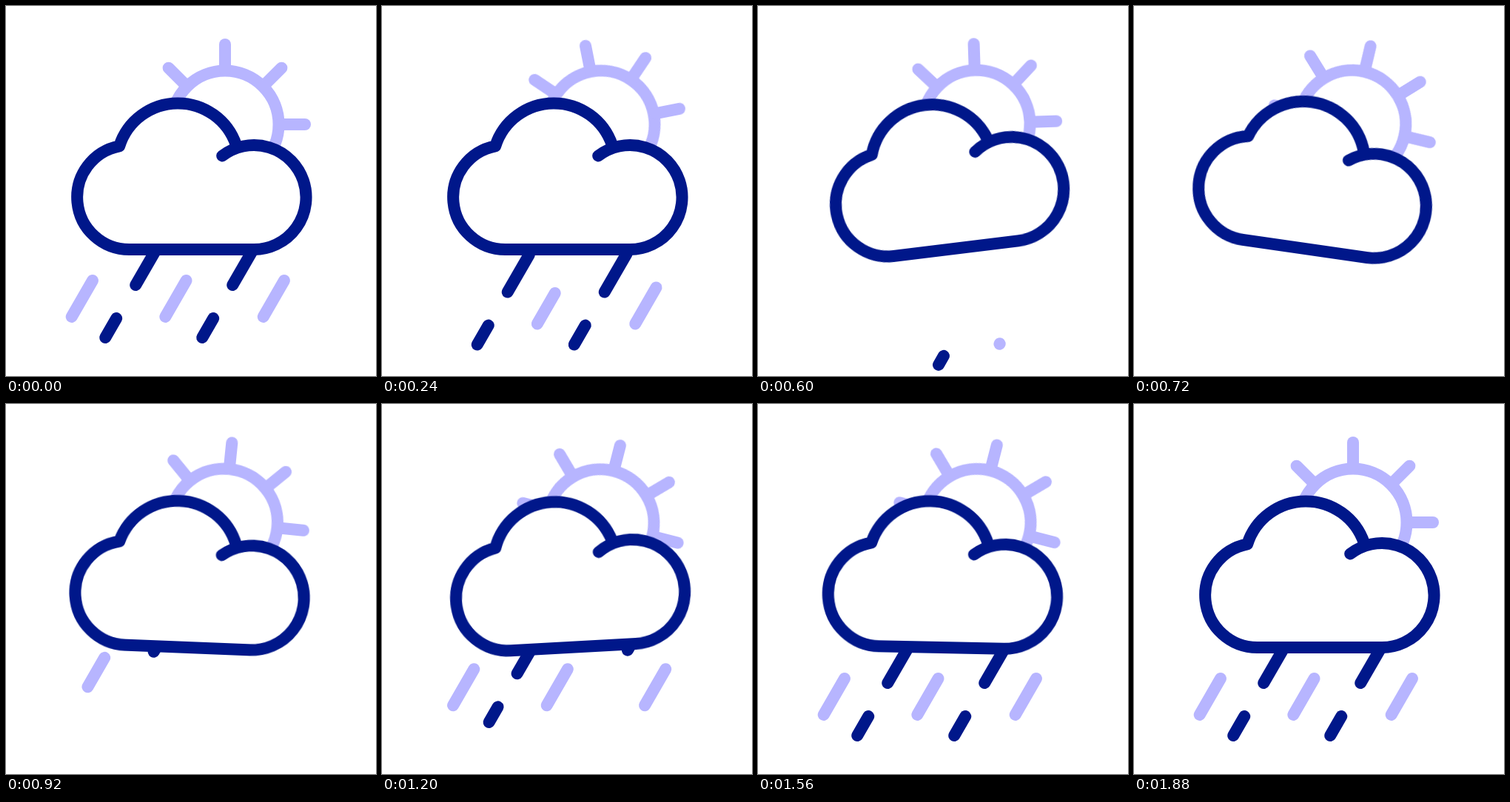
Animation of 500x500 px, one loop 1960 ms. Source, as an HTML page:

```html
<!DOCTYPE html>
<html lang="en">
<head>
<meta charset="utf-8">
<title>Sun, cloud and rain</title>
<style>
  html, body { margin: 0; width: 100%; height: 100%; overflow: hidden; background: #fff; }
  svg {
    --t: 0;
    --dark: #00178a;
    --light: #b7b5ff;
    display: block; width: 100%; height: 100%;
    fill: none; stroke-width: 16; stroke-linecap: round; stroke-linejoin: round;
  }
  /* Animations are paused; the script sets --t in whole steps of 40 ms. */
  #sun, #cloud {
    animation: 1960ms linear infinite paused;
    animation-delay: calc(var(--t) * -1ms);
  }
  #sun { stroke: var(--light); transform-origin: 295.2px 160px; animation-name: spin; }
  #cloud { stroke: var(--dark); fill: #fff; transform-origin: 248px 190px; animation-name: wobble; }
  .light { stroke: var(--light); }
  .dark { stroke: var(--dark); }

  @keyframes spin {
    0%      { transform: rotate(0deg); animation-timing-function: cubic-bezier(.333, 0, .667, 0); }
    12.245% { transform: rotate(-11.2deg); animation-timing-function: cubic-bezier(.333, .208, .667, .636); }
    30.612% { transform: rotate(-91.9deg); animation-timing-function: cubic-bezier(.333, .317, .667, .644); }
    46.939% { transform: rotate(-174.2deg); animation-timing-function: cubic-bezier(.333, .315, .667, .673); }
    61.224% { transform: rotate(-255.6deg); animation-timing-function: cubic-bezier(.333, .38, .667, .827); }
    79.592% { transform: rotate(-345.6deg); animation-timing-function: cubic-bezier(.333, .963, .667, 1); }
    95.918%, 100% { transform: rotate(-360deg); }
  }
  @keyframes wobble {
    0%, 14.286% { transform: rotate(0deg); animation-timing-function: cubic-bezier(.364, 0, .636, 1); }
    26.531% { transform: rotate(-15deg); animation-timing-function: cubic-bezier(.364, 0, .636, 1); }
    36.735% { transform: rotate(8.2deg); animation-timing-function: cubic-bezier(.364, 0, .636, 1); }
    57.143% { transform: rotate(-3.6deg); animation-timing-function: cubic-bezier(.364, 0, .636, 1); }
    77.551% { transform: rotate(1.2deg); animation-timing-function: cubic-bezier(.364, 0, .636, 1); }
    95.918%, 100% { transform: rotate(0deg); }
  }
</style>
</head>
<body>
<svg id="stage" viewBox="0 0 500 500">
  <g id="sun">
    <circle cx="296" cy="160" r="72.5"/>
  </g>
  <g id="rain"></g>
  <path id="cloud" d="M292.2 202.5A70.5 70.5 0 1 1 335 329H166.5A70.5 70.5 0 0 1 153.2 189.3A83 83 0 0 1 311 188"/>
</svg>
<script>
  const LOOP = 1960, STEP = 40, TURN = 700;
  const BASE = 329, DX = -0.5, DY = 0.866;
  const stage = document.getElementById('stage');

  function add(parent, name, attrs) {
    const el = document.createElementNS('http://www.w3.org/2000/svg', name);
    for (const key in attrs) el.setAttribute(key, attrs[key]);
    return document.getElementById(parent).appendChild(el);
  }

  for (let a = 0; a < 360; a += 45) {
    add('sun', 'path', { d: 'M296 86V52', transform: `rotate(${a} 296 160)` });
  }

  // Dashes are distances below the cloud along the slanted line.
  // out: start time, start distance, speed of the erasing end; in: start time, speed of the front.
  const LIGHT = [[48.5, 105]], DARK = [[-60, 55.5], [107.5, 137.5]];
  const drops = [
    { x: 141.2, tone: 'light', dashes: LIGHT, out: [0, 48, 0.31], in: [715, 0.3] },
    { x: 267.8, tone: 'light', dashes: LIGHT, out: [173, 48, 0.3], in: [870, 0.3] },
    { x: 400.2, tone: 'light', dashes: LIGHT, out: [270, 48, 0.3], in: [885, 0.3] },
    { x: 203, tone: 'dark', dashes: DARK, out: [225, 0, 0.56], in: [903, 0.393] },
    { x: 334, tone: 'dark', dashes: DARK, out: [225, 0, 0.443], in: [1190, 0.42] }
  ];
  for (const drop of drops) {
    drop.lines = drop.dashes.map(() => add('rain', 'line', { class: drop.tone }));
  }

  const LEAVE = [[0, 0], [120, 3], [240, 11], [600, 42.5], [640, 46.5], [700, 50]];
  const ARRIVE = [[700, -46], [920, -32.5], [1200, -14.7], [1380, -4.5], [1560, 0], [LOOP, 0]];

  function along(keys, t) {
    const i = Math.max(1, keys.findIndex(k => k[0] >= t));
    const [t0, v0] = keys[i - 1], [t1, v1] = keys[i];
    return v0 + (v1 - v0) * (t - t0) / (t1 - t0);
  }

  function drawDrop(drop, t) {
    const leaving = t < TURN;
    const shift = along(leaving ? LEAVE : ARRIVE, t);
    const [t0, d0, speed] = drop.out;
    const tail = leaving && t > t0 ? d0 + (t - t0) * speed : -60;
    const front = leaving ? 999 : (t - drop.in[0]) * drop.in[1];
    drop.dashes.forEach(([from, to], i) => {
      const a = Math.max(from + shift, tail, -20);
      const b = Math.min(to + shift, front);
      const line = drop.lines[i];
      line.setAttribute('visibility', b > a && b > 0 ? 'visible' : 'hidden');
      line.setAttribute('x1', drop.x + DX * a);
      line.setAttribute('y1', BASE + DY * a);
      line.setAttribute('x2', drop.x + DX * b);
      line.setAttribute('y2', BASE + DY * b);
    });
  }

  const start = performance.now();
  function draw() {
    const elapsed = (performance.now() - start) % LOOP;
    const t = Math.floor(elapsed / STEP) * STEP;
    stage.style.setProperty('--t', t);
    drops.forEach(drop => drawDrop(drop, t));
    requestAnimationFrame(draw);
  }
  draw();
</script>
</body>
</html>
```
